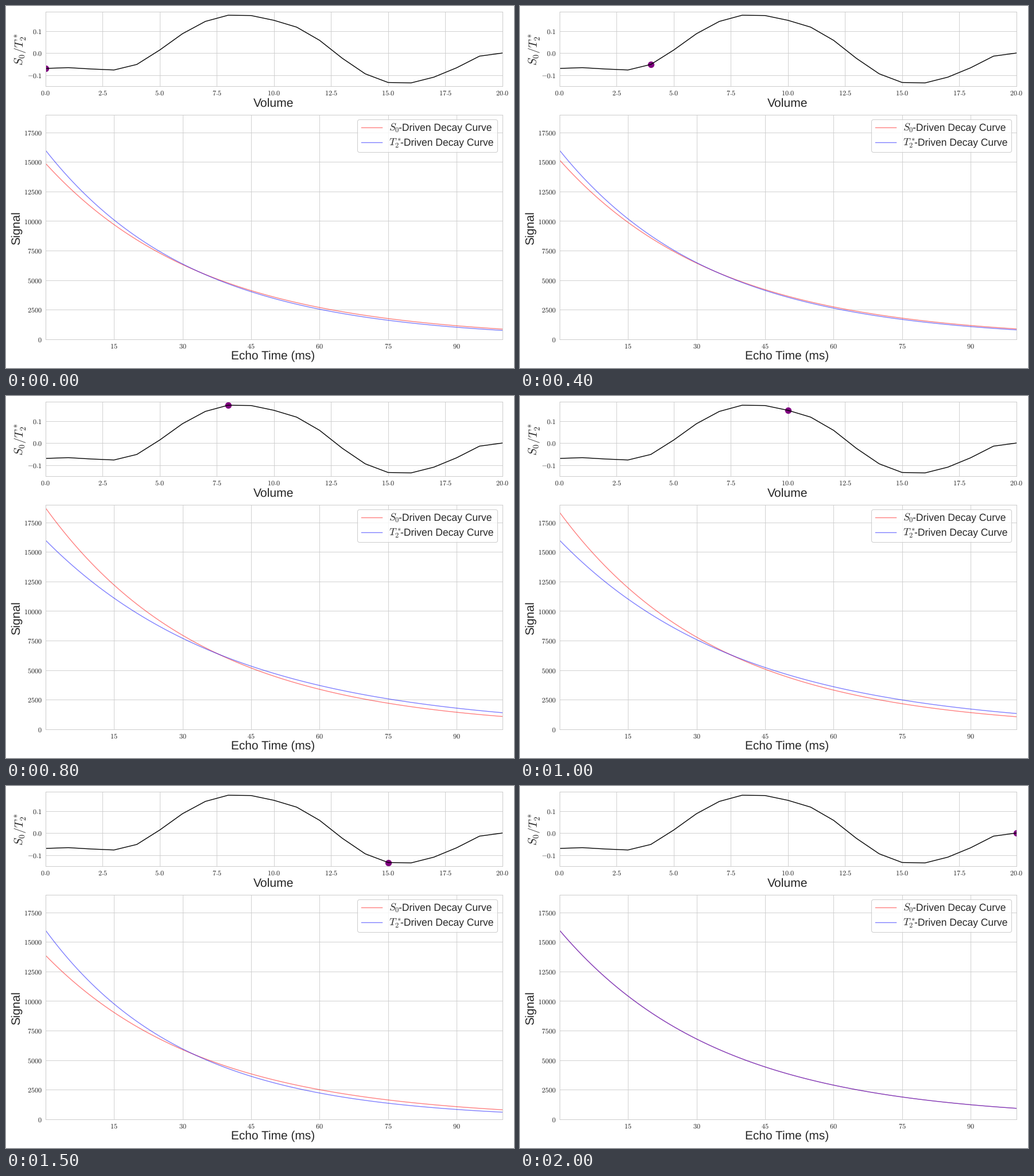
Animation of 885x632 px, one loop 2.1 s. Source, as a matplotlib script:

```python
import numpy as np
import matplotlib.pyplot as plt
from matplotlib.animation import FuncAnimation
from matplotlib.patches import FancyBboxPatch

plt.rcParams.update({
    "font.family": "Liberation Sans",
    "mathtext.fontset": "cm",
    "text.hinting": "none",
    "text.color": "0.15",
})

W, H, DPI = 885, 632, 80
GRAY = "0.8"
S0, T2S = 16000, 35
echo_times = np.arange(0, 101)
change = np.array([
    -0.0695, -0.066, -0.072, -0.0765, -0.0515, 0.0135, 0.0875,
    0.143, 0.171, 0.1695, 0.148, 0.117, 0.0575, -0.024,
    -0.094, -0.133, -0.135, -0.109, -0.0665, -0.014, 0.0])
volumes = np.arange(len(change))

fig = plt.figure(figsize=(W / DPI, H / DPI), dpi=DPI, facecolor="white")


def panel(top, bottom, xlim, ylim, xticks, yticks, fmt):
    """Add gridded axes; top and bottom are pixels from the top edge."""
    left, right = 68.7, 864.7
    ax = fig.add_axes([left / W, 1 - bottom / H,
                       (right - left) / W, (bottom - top) / H])
    ax.set(xlim=xlim, ylim=ylim, xticks=xticks, yticks=yticks, axisbelow=True)
    ax.grid(color=GRAY, lw=0.8)
    ax.spines[:].set(color=GRAY, linewidth=0.9)
    ax.tick_params(length=0, pad=5.4, labelsize=11, labelcolor="0.15")
    for axis in (ax.xaxis, ax.yaxis):
        axis.set_major_formatter(lambda v, _: f"${v:{fmt}}$")
    return ax


def label(x, y, text, size=19, ha="center", rotation=0):
    """Write text with its baseline anchored at pixel (x, y)."""
    fig.text(x / W, 1 - y / H, text, size=size, ha=ha, va="baseline",
             rotation=rotation, rotation_mode="anchor", zorder=6)


def decay(s0, t2s):
    return s0 * np.exp(-echo_times / t2s)


top = panel(9.9, 140.1, (0, 20), (-0.15, 0.187),
            np.arange(0, 20.1, 2.5), [-0.1, 0, 0.1], ".1f")
top.plot(volumes, change, color="black", lw=1.25)
dot = top.scatter([0], [change[0]], s=104, color="purple", lw=0, zorder=1)

main = panel(189.7, 581.7, (0, 100), (0, 19000),
             np.arange(15, 91, 15), np.arange(0, 17501, 2500), ".0f")
s0_line, = main.plot([], [], color="red", alpha=0.5, lw=1.25)
t2_line, = main.plot([], [], color="blue", alpha=0.5, lw=1.25)

label(466.5, 176, "Volume")
label(465, 617, "Echo Time (ms)", size=18.8)
label(24, 387.5, "Signal", rotation=90)
label(29.5, 76, "$S_0/T_2^*$", size=18.5, rotation=90)

# Legend
fig.add_artist(FancyBboxPatch(
    (612.5, H - 255.5), 244, 57, transform=None, zorder=4,
    boxstyle="round,pad=0,rounding_size=3.6",
    fc=(1, 1, 1, 0.8), ec=GRAY, lw=0.9))
for y, color, symbol, x in ((212, "red", "$S_0$", 683.5),
                            (238, "blue", "$T_2^*$", 687)):
    fig.add_artist(plt.Line2D([619, 654.5], [H - y] * 2, transform=None,
                              color=color, alpha=0.5, lw=1.25, zorder=5))
    label(667, y + 5, symbol, size=16, ha="left")
    label(x, y + 5, "-Driven Decay Curve", size=15.8, ha="left")


def update(i):
    scale = 1 + change[i]
    dot.set_offsets([(volumes[i], change[i])])
    s0_line.set_data(echo_times, decay(S0 * scale, T2S))
    t2_line.set_data(echo_times, decay(S0, T2S * scale))
    return dot, s0_line, t2_line


anim = FuncAnimation(fig, update, frames=len(volumes), interval=100,
                     repeat=True, repeat_delay=0)
plt.show()
```
